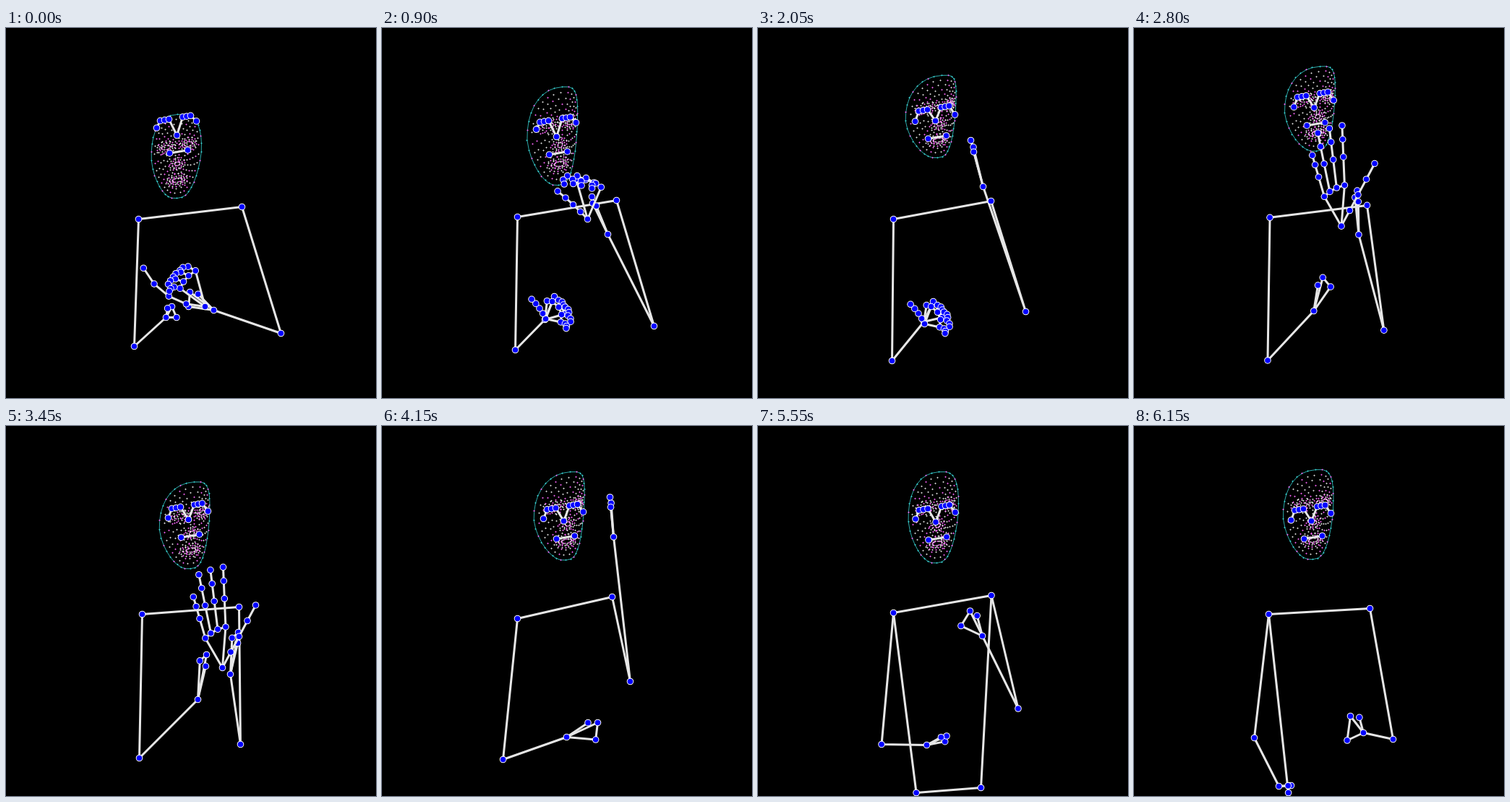
Animation, 512 px wide and 512 px high, one loop 6200 ms. Source, as an HTML page with a canvas:

```html
<!DOCTYPE html>
<html lang="en">
<head>
<meta charset="utf-8">
<title>Pose tracking</title>
<style>
html, body { margin: 0; width: 100%; height: 100%; overflow: hidden; background: #000; }
canvas { display: block; width: 100%; height: 100%; }
</style>
</head>
<body>
<canvas id="stage" width="512" height="512"></canvas>
<script>
const ctx = document.getElementById('stage').getContext('2d');
const LOOP = 6200, STEP = 50, DEG = Math.PI / 180;
const WHITE = '#e6e6e6', PINK = '#ff66ff', CYAN = '#39d5d5';

// Key poses. head: nose x, y, face centre y, half height; turn: sideways, nod in px.
// Arms: elbow, wrist, offset to the index finger, angle from there to the little finger.
const poses = [
  { t: 0, head: [236, 148, 177, 58], turn: [.04, 15], shoulders: [183, 264, 326, 247],
    right: [177, 440, 221, 400, 8, -15, 62], left: [380, 422, 287, 390, -33, -25, -29] },
  { t: 900, head: [241, 150, 149, 68], turn: [.34, 15], shoulders: [187, 261, 324, 238],
    right: [184, 445, 225, 403, 13, -32, 52], left: [376, 412, 312, 285, -22, -52, -3] },
  { t: 2050, head: [245, 128, 122, 57], turn: [.38, 4], shoulders: [187, 264, 322, 239],
    right: [185, 460, 229, 406, 13, -28, 52], left: [370, 392, 311, 219, -17, -64, 1] },
  { t: 3450, head: [252, 129, 137, 60], turn: [.32, 7], shoulders: [188, 260, 322, 250],
    right: [184, 459, 265, 378, 12, -62, -8], left: [324, 440, 310, 343, 11, -58, -8] },
  { t: 4150, head: [251, 131, 124, 61], turn: [.38, 8], shoulders: [187, 266, 318, 236],
    right: [167, 461, 255, 430, 43, -20, 30], left: [343, 353, 320, 153, -5, -55, 1] },
  { t: 4950, head: [246, 134, 130, 64], turn: [.13, 12], shoulders: [188, 256, 319, 216],
    right: [175, 449, 266, 384, 38, -24, 27], left: [361, 348, 303, 156, -16, -46, 0] },
  { t: 6150, head: [245, 131, 122, 62], turn: [.25, 6], shoulders: [186, 260, 326, 252],
    right: [166, 431, 200, 498, 17, -1, 0], left: [358, 433, 317, 424, -18, -23, -77] }
];

// Tracked hands: root offset from the index finger, palm length and heading,
// knuckle fan, curl per joint, finger stretch; thumb heading, bend and length.
const hands = [
  { arm: 'left', from: 0, to: 450, root: [21, 20], palm: 48, dir: -118, fan: 13,
    curl: -38, stretch: .33, thumb: [-172, 16, 2.2] },
  { arm: 'left', from: 450, to: 1450, root: [-6, 31], palm: 54, dir: -93, fan: -13,
    curl: -62, stretch: .32, thumb: [-134, -2, 1.05] },
  { arm: 'left', from: 2800, to: 3800, root: [-22, 49], palm: 53, dir: -97, fan: 11.5,
    curl: 0, stretch: 1, thumb: [-62, 0, 1.85] },
  { arm: 'right', from: 450, to: 2700, root: [-12, 31], palm: 24, dir: -42, fan: -27,
    curl: 40, stretch: .5, thumb: [-118, -5, 1.4] },
  { arm: 'right', from: 4600, to: 5500, root: [-37, 24], palm: 48, dir: -26, fan: -8,
    curl: 20, stretch: .45, thumb: [-55, 18, 1.1] }
];
const handLinks = [[0,1,2,3,4], [0,5,6,7,8], [5,9,10,11,12], [9,13,14,15,16], [13,17,18,19,20], [0,17]];
const headLinks = [[0,1,2,3,8,4,5,6,7], [9,10]];

const go = ([x, y], angle, len) => [x + Math.cos(angle * DEG) * len, y + Math.sin(angle * DEG) * len];
const bump = (t, mid, half) => Math.abs(t - mid) < half ? Math.cos((t - mid) / half * Math.PI / 2) ** 2 : 0;

function poseAt(t) {
  const n = poses.findIndex(p => p.t > t);
  const b = poses.at(n), a = n < 0 ? b : poses[n - 1];
  const k = n < 0 ? 0 : (t - a.t) / (b.t - a.t);
  const mix = key => a[key].map((v, i) => v + (b[key][i] - v) * k);
  const pose = Object.fromEntries(Object.keys(a).filter(key => key !== 't').map(key => [key, mix(key)]));

  // The head tips back once, and the left arm reaches up once.
  const tip = 22 * bump(t, 2650, 600), reach = bump(t, 4560, 390);
  pose.head[1] -= tip;
  pose.head[2] -= tip;
  pose.left[1] -= 25 * reach;
  pose.left[3] -= 95 * reach;
  return pose;
}

// Face mesh in unit coordinates: [u, v, colour].
const oval = a => {
  const c = Math.cos(a), s = Math.sin(a);
  return [Math.sign(c) * Math.abs(c) ** .75 * (1 - (s > 0 ? .25 : .08) * s), Math.sign(s) * Math.abs(s) ** .9];
};
const circle = a => [Math.cos(a), Math.sin(a)];
const ring = (n, shape, cu, cv, ru, rv, colour) => Array.from({ length: n }, (_, i) => {
  const [u, v] = shape((i + ru * 7) / n * 2 * Math.PI);
  return [cu + u * ru, cv + v * rv, colour(i)];
});
const mixed = every => i => i % every ? WHITE : PINK;
const outline = ring(36, oval, 0, 0, 1, 1, i => i % 3 ? CYAN : PINK);
const mesh = [...outline];
for (let r = .88; r > .3; r -= .115) mesh.push(...ring(Math.round(12 + 22 * r), oval, 0, 0, r, r, mixed(3)));
for (let k = 1; k <= 3; k++) {
  for (const side of [-1, 1]) mesh.push(...ring(14, circle, side * .45, -.25, .08 + .09 * k, .05 * k, mixed(2)));
  mesh.push(...ring(12, circle, 0, .18, .1 * k, .05 * k, mixed(2)));
  mesh.push(...ring(18, circle, 0, .57, .1 + .1 * k, .05 * k, mixed(2)));
}
for (let v = -.35; v < .15; v += .08) mesh.push([-.07, v, WHITE], [.07, v, PINK]);

function drawFace({ head: [x, , cy, h], turn: [turn] }) {
  const w = 34.5, cx = x - 18 * turn;
  const place = ([u, v]) => [
    cx + w * (u + turn * (1 - u * u)) - 8 * turn * v,
    cy + h * v - 6 * u * (1 - v * v / 2)
  ];
  ctx.strokeStyle = CYAN;
  ctx.lineWidth = .8;
  ctx.beginPath();
  outline.forEach(p => ctx.lineTo(...place(p)));
  ctx.closePath();
  ctx.stroke();
  for (const p of mesh) {
    const [px, py] = place(p).map(Math.round);
    ctx.fillStyle = p[2];
    ctx.globalAlpha = .5;
    ctx.fillRect(px - 1.5, py - .5, 3, 1);
    ctx.fillRect(px - .5, py - 1.5, 1, 3);
    ctx.globalAlpha = 1;
    ctx.fillRect(px - .5, py - .5, 1, 1);
  }
}

function drawGraph(pts, links, width = 3) {
  ctx.strokeStyle = WHITE;
  ctx.lineWidth = width;
  ctx.lineJoin = ctx.lineCap = 'round';
  for (const link of links) {
    ctx.beginPath();
    link.forEach(i => ctx.lineTo(...pts[i]));
    ctx.stroke();
  }
  for (const i of new Set(links.flat())) {
    for (const [radius, colour] of [[4.8, '#fff'], [3.8, '#00f']]) {
      ctx.fillStyle = colour;
      ctx.beginPath();
      ctx.arc(...pts[i], radius, 0, 2 * Math.PI);
      ctx.fill();
    }
  }
}

// Ears, eyes, nose and mouth sit on one tilted template around the nose.
function drawHead({ head: [x, y], turn: [, nod] }) {
  const at = (dx, dy) => [x + dx, y + dy - .17 * dx];
  const ear = -nod, eye = -15 - .6 * nod;
  drawGraph([
    at(-28, ear), at(-23, eye), at(-17, eye), at(-11, eye),
    at(8, eye), at(13.5, eye), at(19, eye), at(27, ear),
    [x, y], at(-10, 23), at(15, 23)
  ], headLinks);
}

function armPoints([ex, ey, wx, wy, dx, dy, spread]) {
  const wrist = [wx, wy], len = Math.hypot(dx, dy), dir = Math.atan2(dy, dx) / DEG;
  return [
    [ex, ey], wrist,
    go(wrist, dir + spread, len * .85),
    [wx + dx, wy + dy],
    go(wrist, dir - spread * .3, len * .75)
  ];
}

function drawBody({ shoulders: [rx, ry, lx, ly], right, left }, t) {
  const hipX = 224 - (t - 4950) / 110;
  const pts = [[rx, ry], [lx, ly], [hipX, 507], [308, 500], ...armPoints(right), ...armPoints(left)];
  const links = [[0, 1], [0, 4, 5], [1, 9, 10]];
  for (const w of [5, 10]) links.push([w, w + 1, w + 2, w], [w, w + 3]);
  if (t >= 4700) links.push([0, 2]);
  if (t >= 4700 && t < 5600) links.push([2, 3, 1]);
  drawGraph(pts, links);
}

function handPoints(root, { palm, dir, fan, curl, stretch, thumb: [heading, bend, reach] }) {
  const pts = [root];
  for (let j = 0; j < 4; j++) pts.push(go(pts.at(-1), heading + bend * j, palm * reach / 4));
  for (let f = 0; f < 4; f++) {
    const spread = fan * (1 - f), size = palm * stretch * (f === 3 ? .72 : 1);
    let joint = go(root, dir + spread, palm * (1.07 - .06 * f));
    pts.push(joint);
    [.74, .46, .36].forEach((len, j) => {
      joint = go(joint, dir + spread * .4 + curl * (j + 1), size * len);
      pts.push(joint);
    });
  }
  return pts;
}

function drawHands(pose, t) {
  for (const hand of hands) {
    if (t < hand.from || t >= hand.to) continue;
    const [x, y] = armPoints(pose[hand.arm])[3];
    drawGraph(handPoints([x + hand.root[0], y + hand.root[1]], hand), handLinks);
  }
}

function frame() {
  const t = Math.floor(performance.now() % LOOP / STEP) * STEP;
  const pose = poseAt(t);
  ctx.setTransform(1, 0, 0, 1, 0, 0);
  ctx.fillStyle = '#000';
  ctx.fillRect(0, 0, 512, 512);
  ctx.translate(.5, .5);
  drawFace(pose);
  drawHead(pose);
  drawBody(pose, t);
  drawHands(pose, t);
  requestAnimationFrame(frame);
}
frame();
</script>
</body>
</html>
```
